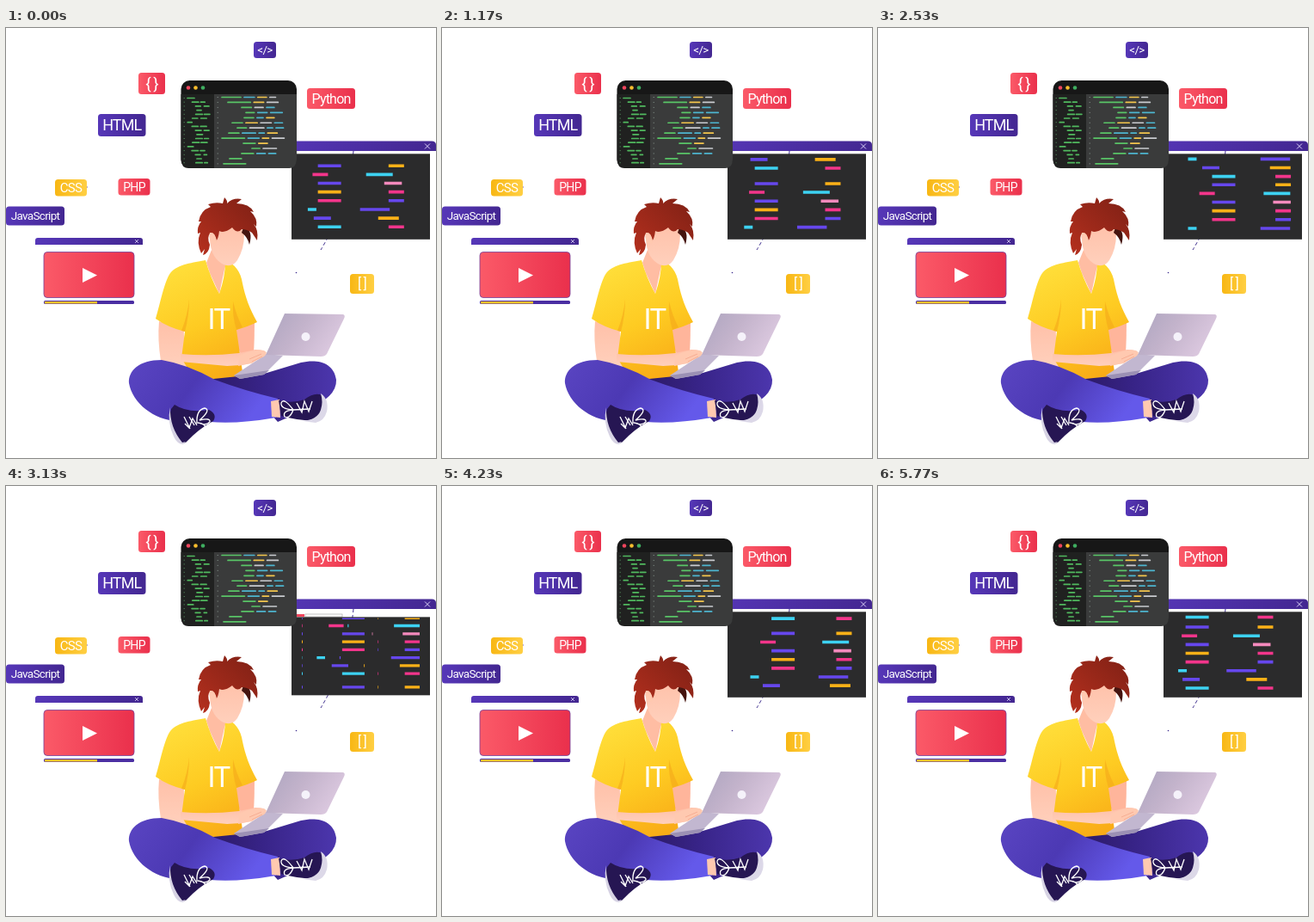
Recreate the animation shown at these times as an HTML page. Size 500x500 px, loop 5.81 s.

```html
<!DOCTYPE html>
<html lang="en">
<head>
<meta charset="utf-8">
<title>Coding</title>
<style>
html, body { margin: 0; width: 100%; height: 100%; overflow: hidden; background: #fff; }
svg { display: block; width: 100vw; height: 100vh; }
text { font-family: Roboto, "Liberation Sans", sans-serif; fill: #fff; text-anchor: middle; letter-spacing: -.05em; }
</style>
</head>
<body>
<svg viewBox="0 0 500 500">
  <defs>
    <linearGradient id="purple"><stop stop-color="#5637b8"/><stop offset="1" stop-color="#432791"/></linearGradient>
    <linearGradient id="red"><stop stop-color="#fb5a68"/><stop offset="1" stop-color="#ea304c"/></linearGradient>
    <linearGradient id="yellow"><stop stop-color="#f8b714"/><stop offset="1" stop-color="#ffcf43"/></linearGradient>
    <linearGradient id="shirt" x1=".2" y1="0" x2=".6" y2="1"><stop stop-color="#ffe03c"/><stop offset=".55" stop-color="#fecb22"/><stop offset="1" stop-color="#f9ac17"/></linearGradient>
    <linearGradient id="hair" x1="0" y1="1" x2="1" y2="0"><stop stop-color="#b5301e"/><stop offset="1" stop-color="#7e2015"/></linearGradient>
    <linearGradient id="skin" x1="0" y1="0" x2="0" y2="1"><stop stop-color="#ffc0a8"/><stop offset="1" stop-color="#ffd0bc"/></linearGradient>
    <linearGradient id="legLeft" x1="0" y1="0" x2="1" y2=".3"><stop stop-color="#5a45c2"/><stop offset=".5" stop-color="#4c39b4"/><stop offset="1" stop-color="#6459ea"/></linearGradient>
    <linearGradient id="legRight"><stop stop-color="#2c1a66"/><stop offset=".4" stop-color="#372386"/><stop offset="1" stop-color="#4c36ad"/></linearGradient>
    <linearGradient id="lid" x1="0" y1="0" x2="1" y2=".4"><stop stop-color="#aca4bf"/><stop offset=".5" stop-color="#c3b3cb"/><stop offset="1" stop-color="#dbc8df"/></linearGradient>
    <clipPath id="codeClip"><rect x="340" y="147.500" width="145" height="92.500"/></clipPath>
  </defs>

  <!-- code window -->
  <path d="M404 143Q398 205 366 258" fill="none" stroke="#3b2a8c" stroke-dasharray="4 3"/>
  <circle cx="337.500" cy="284.500" r=".8" fill="#3b2a8c"/>
  <path d="M308 143V135Q308 131.500 312 131.500H495Q500 131.500 500 136V143Z" fill="url(#purple)"/>
  <path d="M487 134.500l6 6m0-6l-6 6" stroke="#d8cff5"/>
  <rect x="338" y="149" width="9" height="3" fill="#f0455d"/>
  <rect x="348" y="149" width="43" height="3" fill="#fff" stroke="#aaa" stroke-width=".7"/>
  <g id="panel">
    <rect x="332" y="146.300" width="161" height="99.500" fill="#2b2b2c"/>
    <g clip-path="url(#codeClip)"><g id="rows" stroke-width="3.600"></g></g>
  </g>

  <!-- editor -->
  <rect x="203.500" y="61" width="134.500" height="102" rx="10" fill="#171717"/>
  <path d="M242 77H338V153Q338 163 328 163H242Z" fill="#3a3b3b"/>
  <path d="M203.500 77H242V163H213Q203.500 163 203.500 153Z" fill="#202120"/>
  <circle cx="212" cy="69.500" r="2.300" fill="#f0455d"/>
  <circle cx="220.500" cy="69.500" r="2.300" fill="#f7bd2d"/>
  <circle cx="229" cy="69.500" r="2.300" fill="#3fae60"/>
  <g id="editor" stroke-width="1.700" stroke-linecap="round"></g>

  <!-- video window -->
  <path d="M34 252V247Q34 244 37 244H156Q159 244 159 247V252Z" fill="url(#purple)"/>
  <path d="M150 246l4 4m0-4l-4 4" stroke="#d8cff5" stroke-width=".8"/>
  <rect x="44" y="260.500" width="105" height="53" rx="4" fill="url(#red)" stroke="#74409b" stroke-width=".8"/>
  <path d="M89 279L106 287.500L89 296Z" fill="#fff"/>
  <rect x="44" y="317" width="105" height="4" rx="1.500" fill="#4a2ea2"/>
  <path d="M45 318H106V320.500H45Z" fill="#fbc32b"/>
  <path d="M92 185h3" stroke="#4a2ea2" stroke-width=".8"/>
  <g id="tags"></g>

  <!-- torso and arms -->
  <path d="M239 258L233 273L237 285L248 309L254 281L258 268Z" fill="#ffbda3"/>
  <path d="M178 341Q176 362 180 387Q190 394 213 394H270L271 378L211 378Q206 360 207 350Z" fill="url(#skin)"/>
  <path d="M264 344L289 341Q289 361 288 380L274 382Q266 365 264 344Z" fill="#ffb59b"/>
  <path d="M232 270C218 273 200 274 191 285C184 295 180 318 174 338Q188 348 208 353L204 384L212 397Q232 403 241 409L276 407L268 351Q282 347 292 342C283 326 278 312 275 297C273 283 266 274 255 271Q255 289 248 309Q238 291 232 270Z" fill="url(#shirt)"/>
  <path d="M208 353Q213 334 213 315Q211 335 204 352ZM268 351Q263 336 264 318Q268 335 275 348Z" fill="#f6a91a" opacity=".6"/>
  <path d="M203 379Q237 382 271 378L290 374Q301 374 303 378L286 390Q272 393 257 393L203 388Z" fill="url(#skin)"/>
  <text x="247" y="350" font-size="33">IT</text>

  <!-- head -->
  <path d="M237 239Q236 265 251 274Q262 280 269 270Q277 257 277 240Q273 225 258 224L243 231Z" fill="url(#skin)"/>
  <path d="M276 232Q288 234 283 252Q281 243 274 238Z" fill="#45140f"/>
  <path d="M227 262Q221 249 226 238L223 239Q222 231 227 225L224 225Q226 212 238 208L235 205Q244 202 252 204L254 197Q258 201 257 204Q264 197 274 199L268 204Q283 204 288 214L284 213Q293 221 291 231L288 228Q294 235 292 247L286 238Q280 234 274 234Q269 240 263 232Q254 239 248 236Q247 245 244 248Q243 237 238 238Q233 243 237 252Q236 262 229 264L231 257Z" fill="url(#hair)"/>
  <path d="M237 238Q243 237 245 247Q244 253 239 250Q235 244 237 238Z" fill="#ffc9b0"/>

  <!-- legs -->
  <path d="M384 409C381 388 361 385 343 389L300 402L241 408L236 423L300 440L316 458L348 444Q385 430 384 409Z" fill="url(#legRight)"/>
  <path d="M181 386C154 386 142 399 143 413C147 436 172 456 199 457L237 458Q268 461 314 453L316 431Q278 422 243 409Q211 391 181 386Z" fill="url(#legLeft)"/>
  <path d="M308 434L318 432L319 453L309 452Z" fill="#ffc9b0"/>

  <!-- shoes -->
  <path d="M196 438Q211 448 236 444Q246 449 241 457Q224 466 209 482Q202 485 197 477Q188 457 192 443Z" fill="#261653"/>
  <path d="M191 441Q190 464 205 482L209 481L206 484Q199 484 195 475Q187 458 191 441Z" fill="#d7d3e4"/>
  <path d="M207 452l7 14m-1-14l6 10m-11-2l5 5l4-11l5 8M222 460q-1-16 9-18q8 2-6 14q13-3 12 2q-4 5-14 1q10 1 9 8" fill="none" stroke="#fff" stroke-width="1.300"/>
  <path d="M317 433Q333 437 347 432Q359 423 367 427Q375 441 365 456Q344 458 320 451Z" fill="#261653"/>
  <path d="M366 425Q376 432 373 446Q370 457 360 459L344 457Q362 456 366 444Q369 435 366 425Z" fill="#dcd8e8"/>
  <path d="M338 436l6 11l3-13l5 12l4-12M334 444q-11-15-14-8q-1 7 14 8q-13 1-10 8q6 3 10-8l20-1" fill="none" stroke="#fff" stroke-width="1.300"/>

  <!-- laptop -->
  <path d="M303 379L265 404L272 408L300 403L322 381Z" fill="#c2b7d0"/>
  <path d="M265 404L272 408L300 403L306 398Z" fill="#9b90b4"/>
  <path d="M324 332L392 333Q395 334 393 338L373 379Q371 382 366 382L302 380Z" fill="url(#lid)"/>
  <circle cx="348.500" cy="359" r="5" fill="#f5f2fa"/>
  <path d="M271 381Q288 373 300 375Q305 378 300 382L284 390L270 393Z" fill="#ffc9b0"/>
  <path d="M283 385l14-6m-11 9l12-6" stroke="#f3a68c" stroke-width=".8"/>
</svg>

<script>
const LOOP = 5810, BEAT = LOOP / 2;
const $ = id => document.getElementById(id);

function add(parent, name, attrs, content) {
  const node = document.createElementNS('http://www.w3.org/2000/svg', name);
  for (const key in attrs) node.setAttribute(key, attrs[key]);
  if (content) node.textContent = content;
  parent.appendChild(node);
  return node;
}

// Language tags
function tag(label, fill, x, y, width, height, size) {
  add($('tags'), 'rect', { x, y, width, height, rx: 3.5, fill: `url(#${fill})` });
  add($('tags'), 'text', { x: x + width / 2, y: y + height / 2 + size * 0.35, 'font-size': size }, label);
}
tag('</>', 'purple', 288, 16, 26, 19, 13.5);
tag('{ }', 'red', 154, 52, 31, 25, 19);
tag('HTML', 'purple', 107, 100, 55.5, 26, 18);
tag('Python', 'red', 350, 70, 56, 24, 16);
tag('CSS', 'yellow', 57, 176, 37, 19.5, 15);
tag('PHP', 'red', 130.5, 175, 37, 19.5, 14);
tag('JavaScript', 'purple', 0, 207.5, 68, 22, 13.5);
tag('[ ]', 'yellow', 400, 286, 28, 23, 16);

// Small static listing in the editor
let seed = 11;
const random = () => (seed = seed * 16807 % 2147483647) / 2147483647;
const dash = (x, y, length, stroke) => add($('editor'), 'path', { d: `M${x} ${y}h${length}`, stroke });
const indents = [1, 8, 24, 29, 27, 13, 19, 9, 1, 26, 36, 24, 10, 3];
const inks = ['#4db5cf', '#f4c64d', '#c9ccd0', '#4db5cf'];
indents.forEach((indent, i) => {
  const y = 80.5 + i * 5.95;
  let x = 250 + indent;
  const green = 9 + random() * 5 + (indent < 9 ? 13 : 0);
  dash(x, y, green, '#59c567');
  x += green + 4;
  for (let n = 0; n < 3 && i < 12; n++) {
    const length = 6 + random() * 13;
    if (x + length > 325) break;
    dash(x, y, length, inks[(i + n) % 4]);
    x += length + 4;
  }
  add($('editor'), 'path', { d: `M246 ${y}h.6`, stroke: '#75807a', 'stroke-width': 1 });
});
for (let i = 0; i < 17; i++) {
  const y = 81.5 + i * 4.7, shift = 11 * Math.abs(Math.sin(i * 0.52));
  dash(211 + shift, y, 5 + random() * 3, '#50b95e');
  if (i % 3) dash(221 + shift, y, 3 + random() * 4, '#50b95e');
  add($('editor'), 'path', { d: `M207 ${y}h.5`, stroke: '#4d8056', 'stroke-width': 1 });
}

// Scrolling code: each row has a left and a right bar sliding in its own track
const purple = '#6647ed', orange = '#fbb117', pink = '#f3358b', cyan = '#3dd2f2', rose = '#f58abd';
const rowKinds = [
  [purple, 27, orange, 18],
  [pink, 18, cyan, 31],
  [purple, 27, rose, 20.5],
  [orange, 27, pink, 18],
  [pink, 27, purple, 18],
  [cyan, 10, purple, 34.5],
  [purple, 20, orange, 24],
  [cyan, 27, pink, 18]
];
const LEFT = 344, RIGHT = 481, TRACK = 2.7, ROW_STEP = 10.14;
const blockTops = [160.3, 249.2, 329.8, 418, 500.5];
const bars = [];

function bar(x, y, width, stroke) {
  const track = width * TRACK;
  const node = add($('rows'), 'path', {
    d: `M${x} ${y}h${track}`, stroke, 'stroke-dasharray': `${width} ${track - width}`
  });
  bars.push({ node, track });
}
for (const top of blockTops) {
  rowKinds.forEach(([leftInk, leftWidth, rightInk, rightWidth], i) => {
    const y = top + i * ROW_STEP;
    bar(LEFT, y, leftWidth, leftInk);
    bar(RIGHT - rightWidth * TRACK, y, rightWidth, rightInk);
  });
}

// Springy vertical stretch at the start of each beat
const stretchKeys = [[0, 1], [100, 1.025], [235, 0.913], [400, 1.068], [570, 0.955],
  [740, 1.024], [920, 0.99], [1100, 1], [BEAT, 1]];
function stretch(time) {
  const i = stretchKeys.findIndex(([end]) => time < end);
  const [t0, a] = stretchKeys[i - 1], [t1, b] = stretchKeys[i];
  return a + (b - a) * (1 - Math.cos(Math.PI * (time - t0) / (t1 - t0))) / 2;
}

const SCROLL_SPEED = 0.0583, SLIDE_PERIOD = LOOP / 10, PIVOT = 217;
function draw(time) {
  const slide = (0.254 + time / SLIDE_PERIOD) % 1;
  for (const { node, track } of bars) node.setAttribute('stroke-dashoffset', -slide * track);
  $('rows').setAttribute('transform', `translate(0 ${-time * SCROLL_SPEED})`);
  const scale = stretch(time % BEAT);
  $('panel').setAttribute('transform', `translate(0 ${PIVOT * (1 - scale)}) scale(1 ${scale})`);
}

const start = performance.now();
function tick() {
  draw((performance.now() - start) % LOOP);
  requestAnimationFrame(tick);
}
draw(0);
requestAnimationFrame(tick);
</script>
</body>
</html>
```
